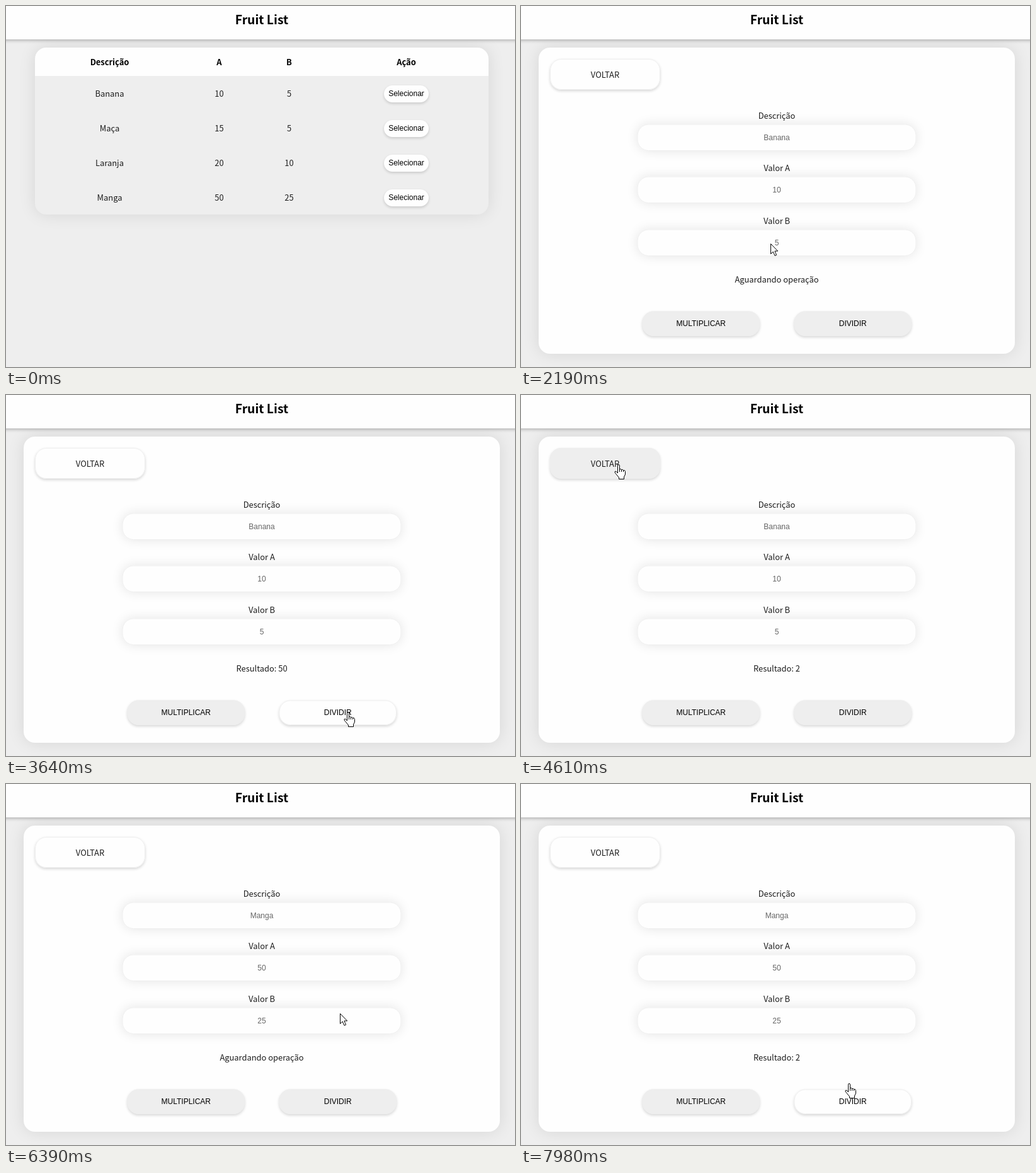
Recreate the animation shown at these times as an HTML page with a canvas. Size 808 px wide and 573 px high, loop 8 s.

```html
<!DOCTYPE html>
<html lang="pt">
<head>
<meta charset="utf-8">
<title>Fruit List</title>
<style>
  html, body { margin: 0; width: 100%; height: 100%; overflow: hidden; background: #eee; }
  canvas { display: block; }
</style>
</head>
<body>
<canvas id="stage" width="808" height="573"></canvas>
<script>
const ctx = document.getElementById('stage').getContext('2d');
const LOOP = 8000, ENTER = 460, HOVER_LAG = 70;
const GREY = '#eee', WHITE = '#fefefe', INK = '#1c1c1c', RADIUS = 18;
const SANS = '"Noto Sans CJK JP", "Noto Sans CJK SC", "Noto Sans", sans-serif';
const BODY = '350 12.9px ' + SANS;
const BOLD = 'bold 12.9px ' + SANS;
const TITLE = 'bold 19.35px ' + SANS;
const UI = '12px "Liberation Sans", Arial, sans-serif';

const FRUITS = [['Banana', 10, 5], ['Maça', 15, 5], ['Laranja', 20, 10], ['Manga', 50, 25]];
const COLUMNS = [164.5, 338.5, 449.5, 635.5];
const [BANANA, , , MANGA] = FRUITS;

// Each move ends on a button; its click opens a fruit, runs an operation or goes back
const ORIGIN = { x: 752, y: 560 };
const MOVES = [
  { x: 639, y: 144, from: 400, to: 1300, click: 1700, fruit: BANANA },
  { x: 318, y: 492, from: 1715, to: 2455, click: 2880, fruit: BANANA, op: '*', bend: 25 },
  { x: 541, y: 504, from: 3030, to: 3600, click: 3780, fruit: BANANA, op: '/' },
  { x: 150, y: 108, from: 3930, to: 4650, click: 4810 },
  { x: 616, y: 303, from: 4920, to: 5740, click: 6060, fruit: MANGA, bend: -19 },
  { x: 335, y: 504, from: 6200, to: 6720, click: 6950, fruit: MANGA, op: '*' },
  { x: 542, y: 504, from: 7040, to: 7560, click: 7780, fruit: MANGA, op: '/' },
  { x: 516, y: 472, from: 7880, to: 8010 }
];

const ARROW = new Path2D('M.5 .5V16.5L4.2 13L7 19.3L9.6 18.2L6.9 12H11.7Z');
const HAND = new Path2D('M5.5 14V2.2Q5.5 .5 7 .5T8.5 2.2V8Q10 6.5 11.5 8.5Q13.4 7.6 14.5 9.5' +
  'Q17.2 9 17.5 11.5V16L15.5 20V23.5H7.5V21L3.2 15.8L1 13Q.4 10.6 3 11.2Z');
const KNUCKLES = new Path2D('M8.5 8V12M11.5 8.5V12M14.5 9.5V12');

function pointerAt(t) {
  if (t < ENTER) return null;
  const i = MOVES.findLastIndex(m => m.from <= t);
  const a = MOVES[i - 1] || ORIGIN, b = MOVES[i];
  const u = Math.min(1, (t - b.from) / (b.to - b.from));
  const s = u * u * (3 - 2 * u);
  const dx = b.x - a.x, dy = b.y - a.y;
  const arc = (b.bend || 0) * 4 * s * (1 - s) / Math.hypot(dx, dy);
  return { x: a.x + dx * s - dy * arc, y: a.y + dy * s + dx * arc };
}

function text(str, x, y, font = BODY, color = INK) {
  ctx.font = font;
  ctx.fillStyle = color;
  ctx.textAlign = 'center';
  ctx.fillText(str, x, y);
}

function box(x, y, w, h, { fill = WHITE, r = RADIUS, blur = 0, drop = 0, shade = 0.1, border } = {}) {
  ctx.save();
  ctx.shadowColor = `rgba(0,0,0,${shade})`;
  ctx.shadowBlur = blur;
  ctx.shadowOffsetY = drop;
  ctx.fillStyle = fill;
  ctx.beginPath();
  ctx.roundRect(x, y, w, h, r);
  ctx.fill();
  ctx.restore();
  if (border) {
    ctx.strokeStyle = border;
    ctx.lineWidth = 1;
    ctx.beginPath();
    ctx.roundRect(x + 0.5, y + 0.5, w - 1, h - 1, r - 0.5);
    ctx.stroke();
  }
}

function button(label, x, y, w, h, aim, { idle, hover, font = UI, baseline, border, r }) {
  const over = !!aim && aim.x >= x && aim.x < x + w && aim.y >= y && aim.y < y + h;
  box(x, y, w, h, { fill: over ? hover : idle, r, blur: 4, drop: 2, shade: 0.16, border });
  text(label, x + w / 2, y + baseline, font, font === UI ? '#000' : INK);
  return over;
}

function drawTable(aim) {
  box(46, 66, 720, 265, { fill: GREY, blur: 27 });
  box(46, 66, 720, 45, { r: [RADIUS, RADIUS, 0, 0] });
  ['Descrição', 'A', 'B', 'Ação'].forEach((name, i) => text(name, COLUMNS[i], 94, BOLD, '#000'));
  FRUITS.forEach((fruit, row) => {
    const y = 126 + 55 * row;
    fruit.forEach((cell, i) => text(cell, COLUMNS[i], y + 18));
    button('Selecionar', 600, y, 71, 27, aim, { idle: WHITE, hover: GREY, r: 13.5, baseline: 17 });
  });
}

function result([, a, b], op) {
  if (!op) return 'Aguardando operação';
  return 'Resultado: ' + (op === '*' ? a * b : a / b);
}

function drawForm(fruit, op, aim) {
  box(28, 66, 756, 486, { blur: 27 });
  const back = button('VOLTAR', 46, 84, 175, 49, aim,
    { idle: WHITE, hover: GREY, font: BODY, baseline: 30, border: GREY });
  ['Descrição', 'Valor A', 'Valor B'].forEach((label, i) => {
    const y = Math.round(187.5 + 83.5 * i);
    text(label, 406, y - 9);
    box(184.5, y - 0.5, 443, 42.5, { blur: 18, border: GREY });
    text(fruit[i], 406, y + 25, UI, '#666');
  });
  text(result(fruit, op), 406, 439);
  const style = { idle: GREY, hover: WHITE, baseline: 23.5, border: GREY };
  const times = button('MULTIPLICAR', 192.5, 484.5, 186.5, 39.5, aim, style);
  const divide = button('DIVIDIR', 433.5, 484.5, 186.5, 39.5, aim, style);
  return back || times || divide;
}

function drawPointer({ x, y }, hand) {
  ctx.save();
  ctx.translate(Math.round(x) - (hand ? 5 : 0), Math.round(y) - (hand ? 1 : 0));
  ctx.fillStyle = '#fff';
  ctx.strokeStyle = '#000';
  ctx.lineWidth = 1;
  const shape = hand ? HAND : ARROW;
  ctx.fill(shape);
  ctx.stroke(shape);
  if (hand) ctx.stroke(KNUCKLES);
  ctx.restore();
}

function draw(t) {
  const pointer = pointerAt(t), aim = pointerAt(t - HOVER_LAG);
  const { fruit, op } = MOVES.findLast(m => m.click <= t) || {};
  ctx.fillStyle = GREY;
  ctx.fillRect(0, 0, 808, 573);
  let hand = false;
  if (fruit) hand = drawForm(fruit, op, aim);
  else drawTable(aim);
  box(-20, -20, 848, 73, { r: 0, blur: 5, drop: 2, shade: 0.25 });
  text('Fruit List', 406, 29, TITLE, '#000');
  if (pointer) drawPointer(pointer, hand);
}

const start = performance.now();
function tick() {
  draw((performance.now() - start) % LOOP);
  requestAnimationFrame(tick);
}
tick();
</script>
</body>
</html>
```
